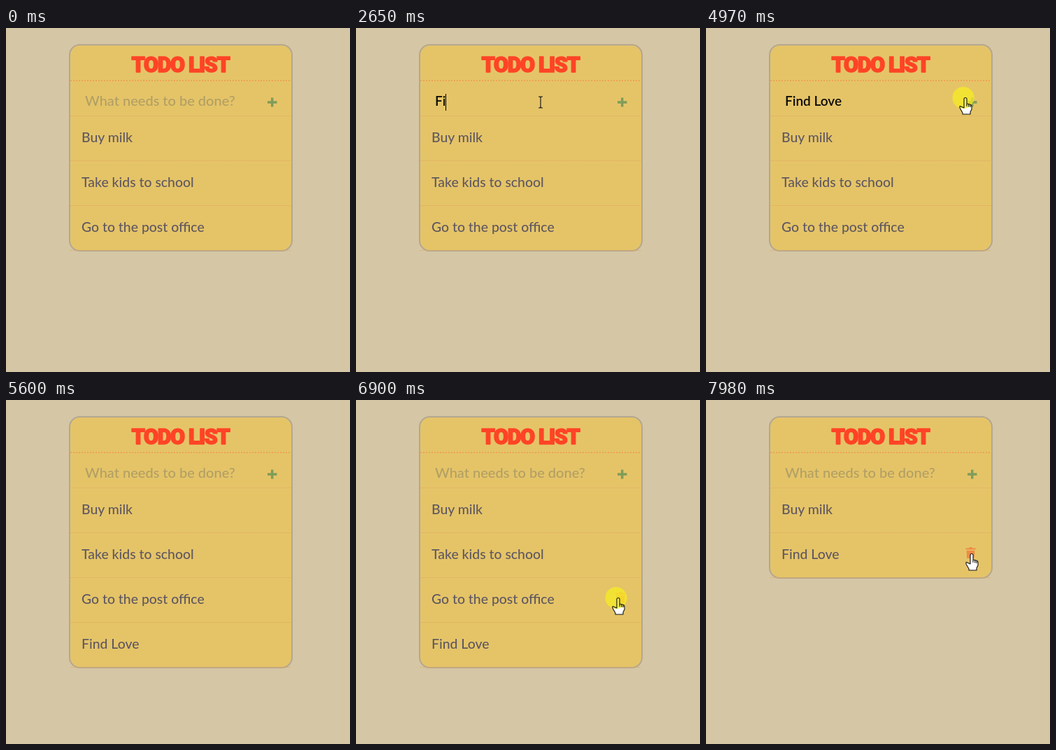
An HTML page for the animation above (8 s loop, 492 by 491 pixels).

```html
<!DOCTYPE html>
<html lang="en">
<head>
<meta charset="utf-8">
<title>Todo list</title>
<style>
  html, body { margin: 0; width: 100%; height: 100%; overflow: hidden; background: #d5c6a5; }
  svg { display: block; width: 492px; height: 491px; }
  text { font: 500 19.4px Lato, "Open Sans", sans-serif; white-space: pre; }
  .title { font: 900 30.5px Roboto, sans-serif; letter-spacing: -1.4px; fill: #ff4426; stroke: #ff4426; stroke-width: 1.6; stroke-linejoin: round; }
  .item { fill: #605860; }
  .line { stroke: #e0a85a; stroke-dasharray: 1 1; shape-rendering: crispEdges; }
  #placeholder { font-size: 20px; fill: #b19f64; }
  #typed { font-size: 19px; font-weight: 600; fill: #0c0b08; }
  .fill { fill: #fff; }
  .ink { fill: none; stroke: #111; stroke-width: 1.1; stroke-linejoin: round; }
</style>
</head>
<body>
<svg viewBox="0 0 492 491">
  <defs>
    <path id="arrowShape" d="M0 0V17l4-4 3 7 3-1.3-3-6.700h5.500Z"/>
    <path id="handShape" d="M-2 1.500a2 2 0 0 1 4 0V8l4.500 1q2.500.5 2.500 3v4l-2 4v3H-4v-2l-3.500-6c-1.500-3-.5-4 1-3L-2 14Z"/>
  </defs>
  <rect id="card" x="91" y="24" width="318" rx="14.500" fill="#e5c468" stroke="#b5a790" stroke-width="2"/>
  <text class="title" x="249.500" y="62.500" text-anchor="middle">TODO LIST</text>
  <path d="M93 75H408" stroke="#f0994d" stroke-width="2" stroke-dasharray="0 4" stroke-linecap="round"/>
  <text id="placeholder" x="113" y="111">What needs to be done?</text>
  <text id="typed" x="113" y="111"></text>
  <path id="caret" d="M.5 94V118" stroke="#000"/>
  <path d="M374 106H387.500M380.700 99.500V112.500" stroke="#7f9c59" stroke-width="3.400"/>
  <g id="rows"></g>
  <g id="trash" fill="#ee8b45">
    <path d="M371.500 147.500H376l1-1.500h3l1 1.500h4.500v2h-14Z"/>
    <path d="M372.500 151H384.500L383.700 162H373.300Z"/>
  </g>
  <g id="cursor">
    <use class="hand fill" href="#handShape"/>
    <use class="arrow fill" href="#arrowShape"/>
    <circle id="press" cy="-.5" r="15.500" fill="#f5ec21" fill-opacity=".75"/>
    <use class="arrow ink" href="#arrowShape"/>
    <g class="hand ink">
      <use href="#handShape"/>
      <path d="M2 8v4M4.700 9v3.500M7 9.500V13"/>
    </g>
    <path class="beam ink" d="M-3-8h2l1 1 1-1h2M0-7V7M-3 8h2l1-1 1 1h2"/>
  </g>
</svg>
<script>
const LOOP = 8000, ROW = 64, HOLD = 170, BLINK = 470;
const FOCUS = 1250, ADD = 5140, REMOVE_THIRD = 6980, REMOVE_SECOND = 7770;
const releases = [FOCUS, ADD, REMOVE_THIRD, REMOVE_SECOND];
const entry = "Find Love";
const chores = ["Buy milk", "Take kids to school", "Go to the post office"];

// Cursor key points: time, x, y
const path = [
  [70, 400, 421], [460, 276, 262], [850, 261, 137], [1080, 264, 106],
  [4500, 264, 106], [4740, 337, 95], [4900, 371, 100],
  [ADD, 371, 100], [5370, 306, 180], [5560, 11, 288],
  [5830, 2, 270], [6450, 420, 292], [6820, 375, 283],
  [7050, 375, 283], [7430, 380, 220]
];
// Typing key points: time, characters typed
const typing = [[2100, 1], [2650, 2], [2960, 5], [3260, 6], [3720, 9]];

const $ = id => document.getElementById(id);
const show = (el, on) => el.style.display = on ? "" : "none";
const showAll = (name, on) => document.querySelectorAll("." + name).forEach(el => show(el, on));
const place = (id, x, y) => $(id).setAttribute("transform", `translate(${x} ${y})`);

// Linear interpolation through [time, ...values] points
function sample(points, t) {
  const next = points.findIndex(p => p[0] > t);
  if (next < 1) return (next ? points.at(-1) : points[0]).slice(1);
  const [a, b] = [points[next - 1], points[next]];
  const k = (t - a[0]) / (b[0] - a[0]);
  return a.slice(1).map((v, i) => v + (b[i + 1] - v) * k);
}

function itemsAt(t) {
  const items = t < ADD ? [...chores] : [...chores, entry];
  if (t >= REMOVE_THIRD) items.splice(2, 1);
  if (t >= REMOVE_SECOND) items.splice(1, 1);
  return items;
}

let shown = "";
function drawList(items) {
  if (shown === String(items)) return;
  shown = String(items);
  const divider = i => `<path class="line" d="M92 ${125.5 + ROW * i}H408"/>`;
  $("card").setAttribute("height", 102 + ROW * items.length);
  $("rows").innerHTML = divider(items.length) + items.map((label, i) =>
    `${divider(i)}<text class="item" x="108" y="${163 + ROW * i}">${label}</text>`).join("");
}

function drawInput(t) {
  const [start, end] = [typing[0][0], typing.at(-1)[0]];
  const count = t < start || t >= ADD ? 0 : Math.floor(sample(typing, t)[0] + 1e-6);
  $("typed").textContent = entry.slice(0, count);
  show($("placeholder"), !count);

  const focused = t >= FOCUS && t < ADD - HOLD;
  const idle = t < start ? t - FOCUS : Math.max(0, t - end);
  show($("caret"), focused && idle % (2 * BLINK) < BLINK);
  place("caret", 113 + Math.round(count && $("typed").getComputedTextLength()), 0);
}

function drawCursor(t, rowCount) {
  const [x, y] = sample(path, t);
  const visible = t >= 70 && (t < 5600 || t >= 5830);
  const row = Math.floor((y - 126) / ROW);
  const overRow = visible && x > 91 && x < 409 && row >= 0 && row < rowCount;
  const iconY = overRow ? 154 + ROW * row : 106;
  const hand = x > 364 && x < 392 && Math.abs(y - iconY) < 15;
  const beam = !hand && x > 92 && x < 364 && y > 78 && y < 125;

  show($("trash"), overRow);
  place("trash", 0, ROW * row);
  show($("cursor"), visible);
  place("cursor", x, y);
  showAll("hand", hand);
  showAll("beam", beam);
  showAll("arrow", !hand && !beam);
  show($("press"), releases.some(r => t >= r - HOLD && t < r));
  $("press").setAttribute("cx", hand ? -3 : 0);
}

function draw(t) {
  const items = itemsAt(t);
  drawList(items);
  drawInput(t);
  drawCursor(t, items.length);
}

const start = performance.now();
function frame() {
  draw((performance.now() - start) % LOOP);
  requestAnimationFrame(frame);
}
frame();
</script>
</body>
</html>
```
